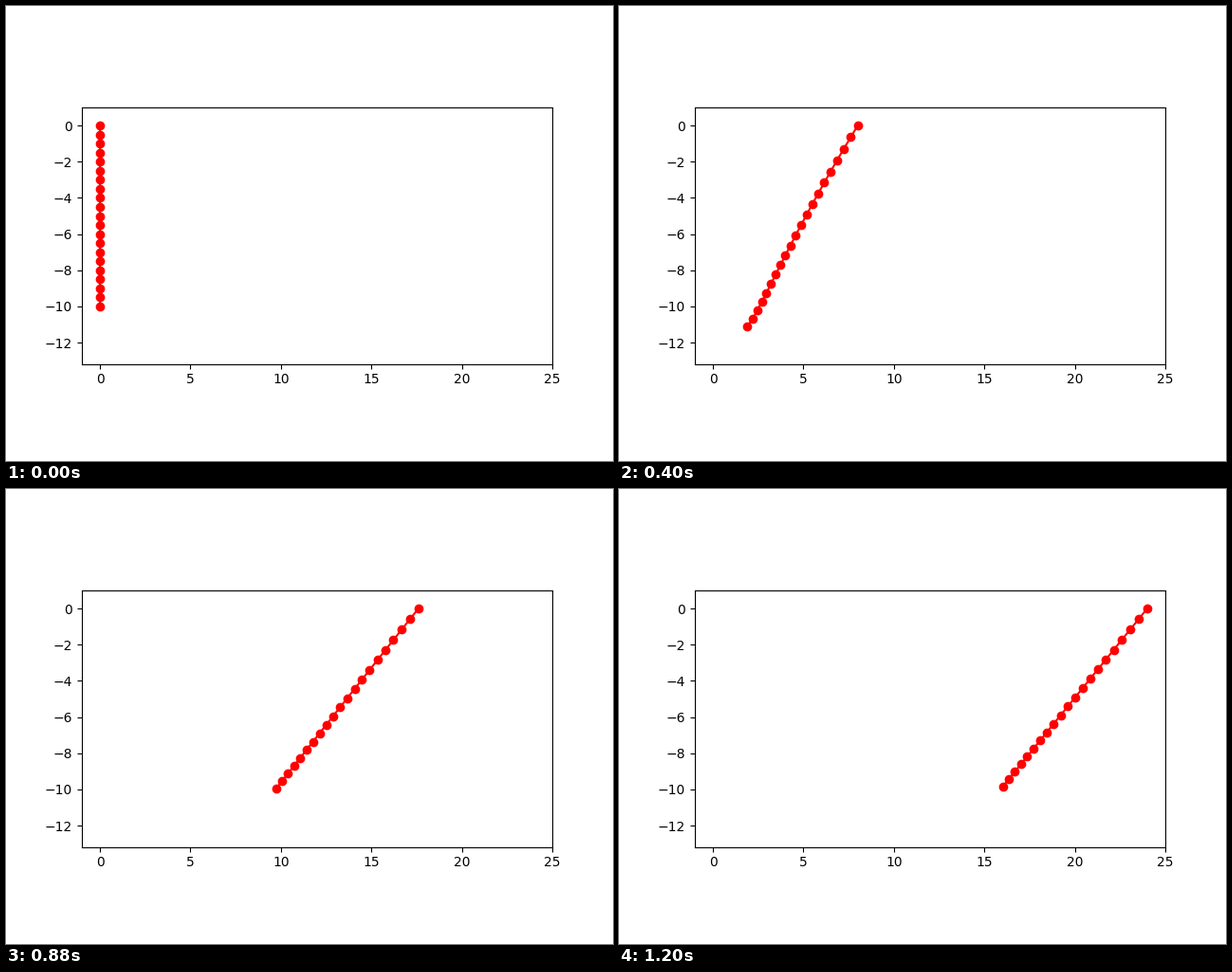
These frames come from a looping animation (640x480 px, 1240 ms). A matplotlib script:

```python
import matplotlib.pyplot as plt
import numpy as np
from matplotlib.animation import FuncAnimation

FRAMES, INTERVAL = 31, 40
NODES, REST = 21, 0.5
SPEED = 0.8      # towing speed of the top node, units per frame
SUBSTEPS = 50

# Starting guess: gravity, stiffness, drag, initial speed (time unit: one frame)
GUESS = np.log([0.5645, 57.6, 0.576, SPEED])

# A few key points on the rope's way: frame, node, x, y
KEYS = np.array([
    (6, 8, 2.62, -5.34),
    (6, 14, 1.52, -8.90),
    (6, 20, 1.36, -12.19),
    (14, 20, 4.14, -10.47),
    (18, 20, 6.76, -10.11),
    (30, 20, 16.03, -9.84),
])


def simulate(params):
    """Tow a chain of springs; one run per row of params -> (frame, run, node, xy)."""
    gravity, stiffness, drag, start = np.exp(params).T[:, :, None, None]
    runs = len(params)
    h = 1 / SUBSTEPS
    pos = np.zeros((runs, NODES, 2))
    pos[..., 1] = -REST * np.arange(NODES)
    vel = np.zeros((runs, NODES - 1, 2))
    vel[..., 0] = start[..., 0]
    path = [pos.copy()]
    for step in range(1, (FRAMES - 1) * SUBSTEPS + 1):
        link = pos[:, 1:] - pos[:, :-1]
        length = np.sqrt((link ** 2).sum(axis=-1, keepdims=True))
        pull = stiffness * (1 - REST / length) * link
        acc = -drag * vel - pull
        acc[:, :-1] += pull[:, 1:]
        acc[..., 1] -= gravity[..., 0]
        vel += acc * h
        pos[:, 1:] += vel * h
        pos[:, 0, 0] = SPEED * step * h
        if step % SUBSTEPS == 0:
            path.append(pos.copy())
    return np.array(path)


def misfit(params):
    frame, node = KEYS[:, :2].astype(int).T
    gap = simulate(params)[frame, :, node] - KEYS[:, None, 2:]
    return gap.transpose(1, 0, 2).reshape(len(params), -1)


def calibrate(params, rounds=8, eps=1e-4):
    """Gauss-Newton with a small line search."""
    scales = 0.5 ** np.arange(6)
    size = len(params)
    for _ in range(rounds):
        gaps = misfit(params + eps * np.vstack([np.zeros(size), np.eye(size)]))
        slope = (gaps[1:] - gaps[0]).T / eps
        move = np.linalg.lstsq(slope, -gaps[0], rcond=None)[0]
        trials = np.clip(params + np.outer(scales, move), GUESS - 0.5, GUESS + 0.5)
        params = trials[np.argmin((misfit(trials) ** 2).sum(axis=1))]
    return params


rope = simulate(calibrate(GUESS)[None])[:, 0]

plt.rcParams["font.family"] = "DejaVu Sans"
fig, ax = plt.subplots(figsize=(6.4, 4.8), dpi=100)
ax.set_aspect("equal")
ax.set_xlim(-1, 25)
ax.set_ylim(-13.187, 1)
ax.set_xticks(range(0, 26, 5))
ax.set_yticks(range(-12, 1, 2))
line, = ax.plot([], [], "o-", color="red")


def draw(frame):
    line.set_data(*rope[frame].T)
    return line,


anim = FuncAnimation(fig, draw, frames=FRAMES, interval=INTERVAL,
                     repeat=True, repeat_delay=0)
plt.show()
```
